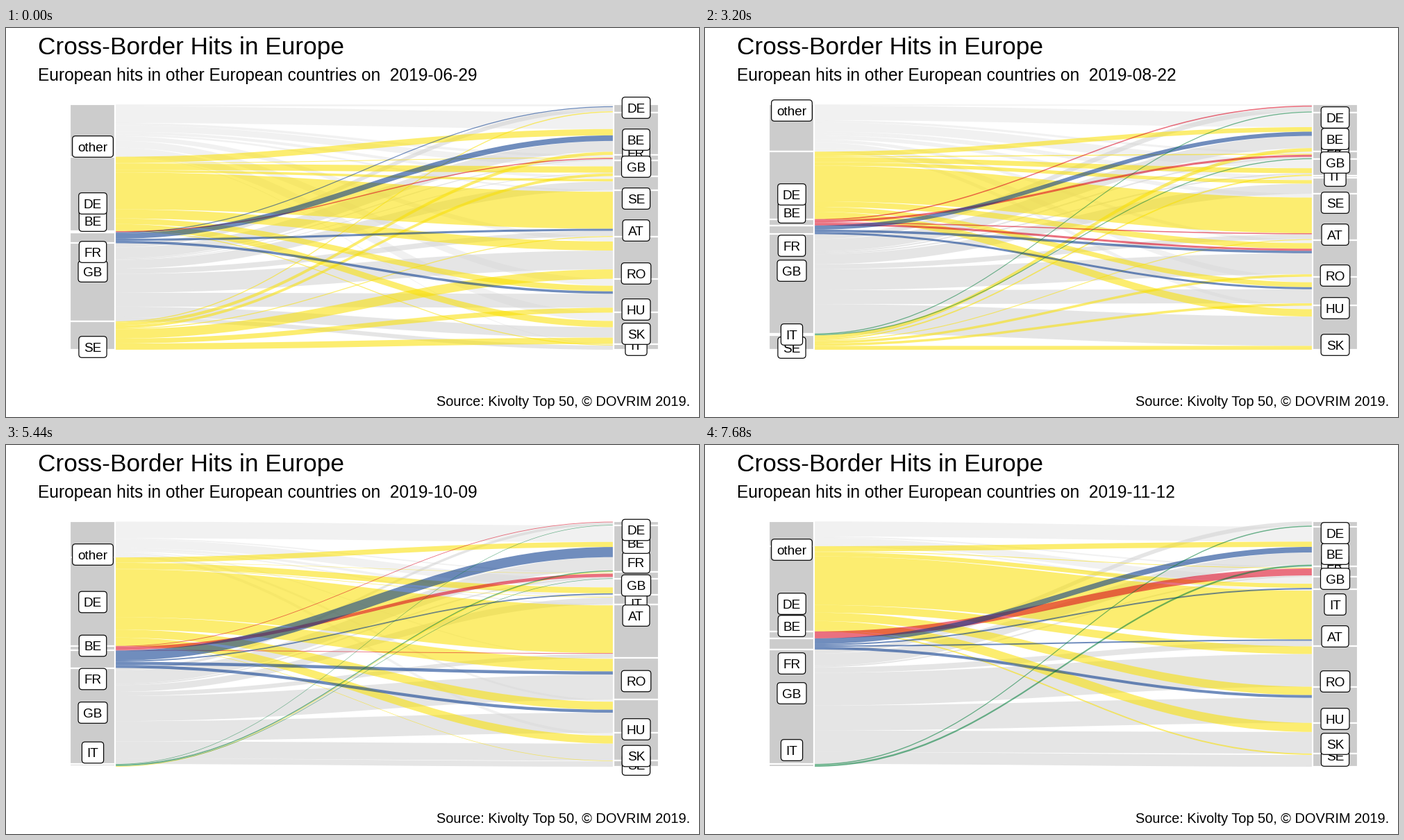
These frames come from a looping animation (998 px wide and 561 px high, 7.98 s). A matplotlib script:

```python
import numpy as np
import matplotlib.pyplot as plt
from matplotlib.animation import FuncAnimation
from matplotlib.patches import FancyBboxPatch, PathPatch, Rectangle
from matplotlib.path import Path
from matplotlib.textpath import TextPath

W, H, DPI = 998, 561, 64
PT = 72 / DPI
STEP, HOLD = 16, 15              # 20 ms ticks per state, ticks at rest
STATES = 25
TOP, BOTTOM = 110.3, 464
X0, X1 = 158, 875                # ribbon ends
KNOT = 0.4
ALPHA = 0.56

plt.rcParams["font.family"] = "Liberation Sans"

ORIGINS = ["other", "DE", "BE", "FR", "GB", "IT", "SE"]
COLOR = dict(other="#e6e6e6", DE="#fae000", BE="#db001c", FR="#00348a",
             GB="#d2d2d2", IT="#007e3a", SE="#fae000")
PAINT = ["other", "GB", "DE", "SE", "BE", "FR", "IT"]
LEFT_BACK_TO_FRONT = ["SE", "GB", "FR", "BE", "DE", "IT", "other"]
RIGHT_BACK_TO_FRONT = ["FR", "IT", "AT", "SE", "SK", "HU", "RO", "GB", "BE", "DE"]
SLOTS = 11
KEYS = []


def key(state, date, left, right, **flows):
    """Flow widths per origin to the eleven targets, and the label heights."""
    grid = np.zeros((len(ORIGINS), SLOTS))
    for name, row in flows.items():
        grid[ORIGINS.index(name), :len(row)] = row
    KEYS.append((state, np.datetime64(date), left, right, grid))


key(0, "2019-06-29",
    dict(other=171, DE=253, BE=278, FR=323, GB=351, SE=460),
    dict(DE=115, BE=161, FR=180, GB=200, SE=246, AT=292, RO=354, HU=406, SK=441, IT=457),
    other=[2.5, 24, 3.5, 9, 0, 4, 2.5, 6.5, 10, 12, 1],
    DE=[0, 9, 1, 9, 0, 3.5, 53, 13, 8, 9, 1.3],
    BE=[0, 0, 1.5],
    FR=[1.3, 8, 0, 0, 0, 0, 3, 0, 3.5],
    GB=[6, 15.5, 1.5, 1, 0, 12.5, 7.5, 27, 20, 15, 6],
    SE=[1.5, 4.5, 0, 4, 0, 0, 1.3, 13.5, 7, 9])
key(2, "2019-07-27",
    dict(other=122, DE=240, BE=264, FR=310, GB=393, SE=432),
    dict(DE=128, BE=160, FR=177, GB=211, SE=238, AT=257, RO=348, HU=392, SK=415, IT=449),
    other=[2.5, 18.5, 4, 11, 0, 2, 1.5, 3, 7, 14],
    DE=[0, 6, 0.8, 7, 0, 4, 54, 9, 7, 8, 1],
    BE=[0, 0, 3.2],
    FR=[1.5, 11, 0, 0, 0, 0, 2, 0, 3],
    GB=[5, 18.5, 5, 1, 0, 15, 6.5, 39, 25, 36, 2],
    SE=[0, 5, 0, 1.5, 0, 0, 1.2, 4.5, 4, 3.5])
key(6, "2019-08-10",
    dict(other=118, DE=196, BE=250, FR=310, GB=393, SE=432),
    dict(DE=125, BE=154, FR=173, GB=191, SE=237, AT=283, RO=344, HU=398, SK=440, IT=457),
    other=[2.5, 18.5, 4, 11, 0, 2.5, 2.5, 8, 6.5, 4],
    DE=[0, 6, 1.5, 6.5, 0, 4, 54, 7.5, 6, 9, 1.2],
    BE=[0, 0, 5, 0, 0, 0, 0, 3],
    FR=[0, 10, 0, 0, 0, 0, 0, 8, 3],
    GB=[4, 16, 3, 1, 0, 14.5, 7.5, 26, 34, 41.5, 3],
    SE=[0, 4.5, 0, 1.5, 0, 0, 1.2, 3.5, 3.5, 4])
key(10, "2019-08-22",
    dict(other=119, DE=240, BE=266, FR=314, GB=350, IT=442, SE=461),
    dict(DE=129, BE=160, FR=176, GB=194, IT=213, SE=252, AT=298, RO=357, HU=404, SK=457),
    other=[1.5, 21, 3, 13, 3, 3, 5.5, 4.5, 8, 5],
    DE=[0, 6.5, 1.5, 7, 0, 5, 51, 8, 7, 10.5],
    BE=[1.6, 0, 3, 0, 0, 0, 1.5, 3],
    FR=[0, 6, 0, 0, 0, 0, 0, 3.5, 3],
    GB=[7, 17.5, 2, 2, 0, 14.5, 7, 30, 20, 42],
    IT=[1.3, 0, 1.3],
    SE=[0, 5, 0, 2, 0, 0, 1.2, 3.5, 3.5, 5.5])
key(15, "2019-09-23",
    dict(other=157, DE=246, BE=304, FR=350, GB=408, SE=428, IT=448),
    dict(DE=123, BE=142, FR=172, GB=208, IT=228, SE=262, AT=308, RO=338, HU=426, SK=461),
    other=[0, 20.5, 1.5, 10.5, 0, 7, 0.5, 2, 5, 5],
    DE=[0, 7.5, 1, 10, 0, 1.5, 71, 17, 10, 9.5],
    BE=[1.8, 0, 3.5, 0, 0, 0, 1.8],
    FR=[0, 21, 0, 1.5, 0, 0, 0, 9, 4.5],
    GB=[4, 18, 1, 0, 0, 19, 4, 36, 25, 18],
    IT=[0, 0, 1.4],
    SE=[0, 2])
key(19, "2019-10-25",
    dict(other=159, DE=207, BE=275, FR=325, GB=364, IT=439),
    dict(DE=122, BE=140, FR=167, GB=197, IT=229, AT=246, RO=343, HU=394, SK=436, SE=461),
    other=[0.5, 27, 2, 14, 0, 0, 3, 0.5, 1, 3],
    DE=[0, 7, 0, 7, 0, 0, 66, 19, 13, 13, 1.5],
    BE=[0, 0, 6],
    FR=[0, 8, 0, 2, 0, 0, 0, 0, 4],
    GB=[3.5, 20, 3, 0, 0, 0, 8, 36, 33, 31, 16],
    IT=[1.4, 3])
key(20, "2019-10-31",
    dict(other=159, DE=243, BE=276, FR=331, GB=370, IT=439),
    dict(DE=126, BE=162, FR=188, GB=209, IT=229, AT=246, RO=343, HU=388, SK=409, SE=440),
    other=[0.5, 26, 2.5, 14, 0, 0, 2.5, 0.5, 1, 3],
    DE=[0, 7, 0, 6, 0, 0, 66, 20, 12, 13, 2],
    BE=[0, 0, 4],
    FR=[0, 10, 0, 1.5, 0, 0, 0, 0, 5.5],
    GB=[3.5, 19.5, 3.5, 0, 0, 0, 7, 36, 33, 31, 16],
    IT=[1.4, 3])
key(24, "2019-11-12",
    dict(other=151, DE=229, BE=261, FR=315, GB=358, IT=440),
    dict(DE=127, BE=157, FR=173, GB=193, IT=230, AT=276, RO=341, HU=395, SK=431, SE=448),
    other=[0, 21.5, 2, 10, 0, 0, 2],
    DE=[0, 7.5, 1, 6, 0, 0, 70, 11, 12, 13, 2],
    BE=[0, 0, 10],
    FR=[0, 8, 0, 2, 0, 0, 2, 0, 4],
    GB=[6, 17.5, 2, 0, 0, 0, 8, 47, 36, 31, 17],
    IT=[1.5, 2.5])


def mix_labels(a, b, w):
    """Slide labels present in both sets; far jumps switch at the middle."""
    near = a if w < 0.5 else b
    out = {}
    for name, y in near.items():
        ya, yb = a.get(name, y), b.get(name, y)
        out[name] = ya + (yb - ya) * w if abs(ya - yb) < 60 else y
    return out


def state_at(k):
    i = max(j for j in range(len(KEYS) - 1) if KEYS[j][0] <= k)
    (k0, d0, l0, r0, g0), (k1, d1, l1, r1, g1) = KEYS[i], KEYS[i + 1]
    w = (k - k0) / (k1 - k0)
    days = int(round((d1 - d0).astype(int) * w))
    grid = g0 + (g1 - g0) * w
    grid *= (BOTTOM - TOP) / grid.sum()
    return str(d0 + days), mix_labels(l0, l1, w), mix_labels(r0, r1, w), grid


def ribbon(ax, y0, y1, h, color):
    a, b = X0 + KNOT * (X1 - X0), X1 - KNOT * (X1 - X0)
    pts = [(X0, y0), (a, y0), (b, y1), (X1, y1),
           (X1, y1 + h), (b, y1 + h), (a, y0 + h), (X0, y0 + h), (X0, y0)]
    C, L = Path.CURVE4, Path.LINETO
    codes = [Path.MOVETO, C, C, C, L, C, C, C, Path.CLOSEPOLY]
    ax.add_patch(PathPatch(Path(pts, codes), fc=color, alpha=ALPHA, lw=0, zorder=1))


def strata(ax, x, w, heights):
    y = TOP
    for h in heights:
        if h > 0.3:
            ax.add_patch(Rectangle((x, y), w, h, fc="#cccccc", ec="white",
                                   lw=2.2 * PT, zorder=2))
        y += h


def label(ax, x, y, name, z):
    ink = TextPath((0, 0), name, size=19, prop=dict(family="Liberation Sans"))
    w = ink.get_extents().width + 16.5
    ax.add_patch(FancyBboxPatch((x - w / 2, y - 15.3), w, 30.6,
                                boxstyle="round,pad=0,rounding_size=4.5",
                                fc="white", ec="black", lw=1.2 * PT, zorder=z))
    ax.text(x, y + 6.8, name, size=19 * PT, ha="center", va="baseline", zorder=z)


def draw_state(k):
    date, left, right, grid = state_at(k)
    fig.clear()
    ax = fig.add_axes([0, 0, 1, 1])
    ax.set(xlim=(0, W), ylim=(H, 0))
    ax.axis("off")

    ax.text(46, 38, "Cross-Border Hits in Europe", size=35.3 * PT)
    ax.text(46, 75.5, "European hits in other European countries on  " + date,
            size=24.5 * PT)
    ax.text(985, 545, "Source: Kivolty Top 50, © DOVRIM 2019.", size=20 * PT,
            ha="right")

    # stacked starts: by origin on the left, by target on the right
    y0 = TOP + (np.cumsum(grid) - grid.ravel()).reshape(grid.shape)
    by_target = grid.T
    y1 = TOP + (np.cumsum(by_target) - by_target.ravel()).reshape(by_target.shape).T
    for name in PAINT:
        i = ORIGINS.index(name)
        for j in range(SLOTS):
            if grid[i, j] > 0.4:
                ribbon(ax, y0[i, j], y1[i, j], grid[i, j], COLOR[name])

    strata(ax, 92.5, 64.8, grid.sum(axis=1))
    strata(ax, 875, 65, grid.sum(axis=0))

    # leader line when the FR label sits far from its block
    fr = ORIGINS.index("FR")
    mid = y0[fr, 0] + grid[fr].sum() / 2
    if left["FR"] - 15 - mid > 14:
        ax.plot([125, 125], [mid, left["FR"] - 15], color="black", lw=PT, zorder=3)

    for x, names, ys in ((125, LEFT_BACK_TO_FRONT, left),
                         (907.5, RIGHT_BACK_TO_FRONT, right)):
        for z, name in enumerate(names):
            if name in ys:
                label(ax, x, ys[name], name, 4 + z)

    fig.canvas.draw()
    return np.asarray(fig.canvas.buffer_rgba())[..., :3].copy()


fig = plt.figure(figsize=(W / DPI, H / DPI), dpi=DPI, facecolor="white")
pictures = [draw_state(k) for k in range(STATES)]
fig.clear()
view = fig.figimage(pictures[0], origin="upper")


def update(i):
    k, tick = divmod(i, STEP)
    if tick < HOLD:
        view.set_data(pictures[k])
    else:
        both = pictures[k].astype(np.uint16) + pictures[k + 1]
        view.set_data((both // 2).astype(np.uint8))
    return [view]


anim = FuncAnimation(fig, update, frames=STATES * STEP - 1, interval=20,
                     repeat=True, repeat_delay=0)
plt.show()
```
